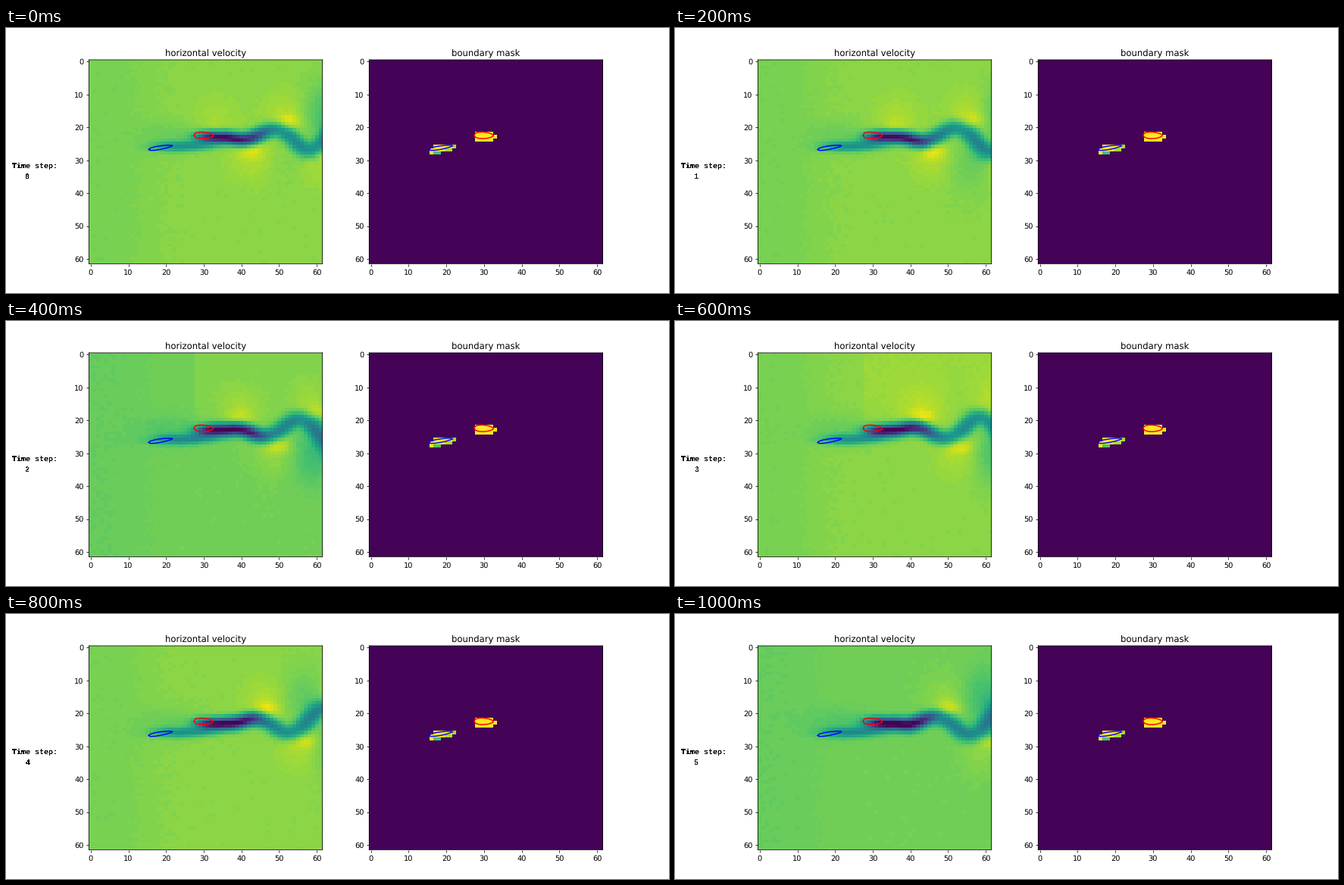
These frames come from a looping animation (875x350 px, 1200 ms). A matplotlib script:

```python
import numpy as np
import matplotlib.pyplot as plt
from matplotlib.animation import FuncAnimation

W, H, DPI = 875, 350, 70
N = 62
FRAMES, INTERVAL = 6, 200
WAVELENGTH, SPEED, FIRST_CREST = 19.0, 3.35, 48.3
CENTRE = 23.2
K = 2 * np.pi / WAVELENGTH

plt.rcParams.update({"path.snap": False, "text.hinting": "none"})
rows, cols = np.mgrid[0:N, 0:N].astype(float)


def bump(col, row, width, height):
    return np.exp(-((cols - col) / width) ** 2 - ((rows - row) / height) ** 2)


def ramp(x, middle, softness):
    return 1 / (1 + np.exp((middle - x) / softness))


def background(step):
    """Slowly pulsing base flow, lighter to the right and at times top right."""
    pulse = np.cos(2 * np.pi * (step - 0.5) / 3)
    left = 0.784 + 0.02 * pulse
    right = 0.811 + 0.025 * pulse
    lift = 0.028 * max(0, np.sin(np.pi * (step - 1) / 3))
    base = left + (right - left) * ramp(cols, 14, 3)
    return base + lift * (cols > 27.5) * ramp(-rows, -20, 2)


def wake(crest):
    """Meandering dark wake behind the red foil."""
    amp = np.maximum(0.17 * (cols - 35.5), 0.15)
    phase = K * (cols - crest)
    slope = amp * K * np.sin(phase)
    dist = (rows - CENTRE + amp * np.cos(phase)) / np.hypot(1, slope)
    width = 1.65 + 0.03 * np.maximum(cols - 30, 0)
    depth = 0.83 * ramp(cols, 28.8, 1.3) * (0.42 + 0.58 * ramp(-cols, -45, 1.6))
    return depth * np.exp(-(dist / width) ** 2)


def small_wake():
    """Short, shallow wake behind the blue foil."""
    depth = 0.31 * ramp(cols, 18, 1.8) * ramp(-cols, -33, 2)
    line = 26 - 0.07 * np.maximum(cols - 24, 0)
    return depth * np.exp(-((rows - line) / 1.5) ** 2)


def lobes(first_bend, side):
    """Fast and slow flow beside the bends; side is -1 above, 1 below."""
    total = np.zeros((N, N))
    for bend in first_bend + WAVELENGTH * np.arange(-1, 2):
        col = bend + 3.8
        row = CENTRE + side * (3.7 + 0.1 * (col - 44))
        strength = ramp(col, 38, 2.5)
        total += 0.14 * strength * bump(col, row, 3.2, 2.5)
        total += 0.05 * ramp(col, 32, 1.5) * bump(col, row + 3 * side, 6, 7)
        total -= 0.12 * ramp(bend, 61, 1.5) * bump(bend - 5, CENTRE + 7 * side, 6, 9)
    return total


def velocity(step):
    crest = FIRST_CREST + SPEED * step
    noise = np.random.default_rng(step + 5).normal(0, 0.0025, (N, N))
    v = background(step) + noise - 0.05 * bump(21, 23, 8, 4.5)
    v += lobes(crest, -1) + lobes(crest + WAVELENGTH / 2, 1)
    v -= wake(crest) + small_wake()
    return np.clip(np.round(v / 0.014) * 0.014, 0, 1)


def boundary():
    mask = np.full((N, N), 0.008)
    mask[22:25, 28:33] = mask[23, 33] = 1
    mask[26, 17:22] = mask[27, 16:20] = mask[28, 16] = 1
    mask[26, 22] = mask[27, 20:22] = 0.87
    mask[28, 17:19] = 0.72
    return mask


def foil(nose, tail, half, points):
    """Closed symmetric profile from nose to tail."""
    angle = np.linspace(0, 2 * np.pi, points)
    s = (1 - np.cos(angle)) / 2
    thick = half * 1.96 * s ** 0.4 * (1 - s) ** 0.6 * np.sign(np.sin(angle))
    return (nose[0] + s * (tail[0] - nose[0]),
            nose[1] + s * (tail[1] - nose[1]) + thick)


def panel(ax, title, field):
    image = ax.imshow(field, cmap="viridis", vmin=0, vmax=1,
                      aspect="auto", interpolation="nearest")
    ax.plot(*foil((27.45, 22.4), (32.5, 22.5), 1.0, 25), color="red", lw=1.5)
    ax.plot(*foil((15.4, 26.75), (21.7, 25.6), 0.55, 13), color="blue", lw=1.5)
    ax.set(title=title, xlim=(-0.5, N - 0.5), ylim=(N - 0.5, -0.5),
           xticks=range(0, N, 10), yticks=range(0, N, 10))
    return image


def label(x, y, text):
    return fig.text(x / W, 1 - y / H, text, family="Liberation Mono", weight="bold",
                    size=10 * 72 / DPI, color="black", antialiased=False)


fig, (flow_ax, mask_ax) = plt.subplots(1, 2, figsize=(W / DPI, H / DPI), dpi=DPI,
                                       facecolor="white")
flow = panel(flow_ax, "horizontal velocity", velocity(0))
panel(mask_ax, "boundary mask", boundary())
label(7.5, 185, "Time step:")
counter = label(25.5, 199, "0")


def update(step):
    flow.set_data(velocity(step))
    counter.set_text(str(step))
    return flow, counter


anim = FuncAnimation(fig, update, frames=FRAMES, interval=INTERVAL,
                     repeat=True, repeat_delay=0, blit=False)
plt.show()
```
